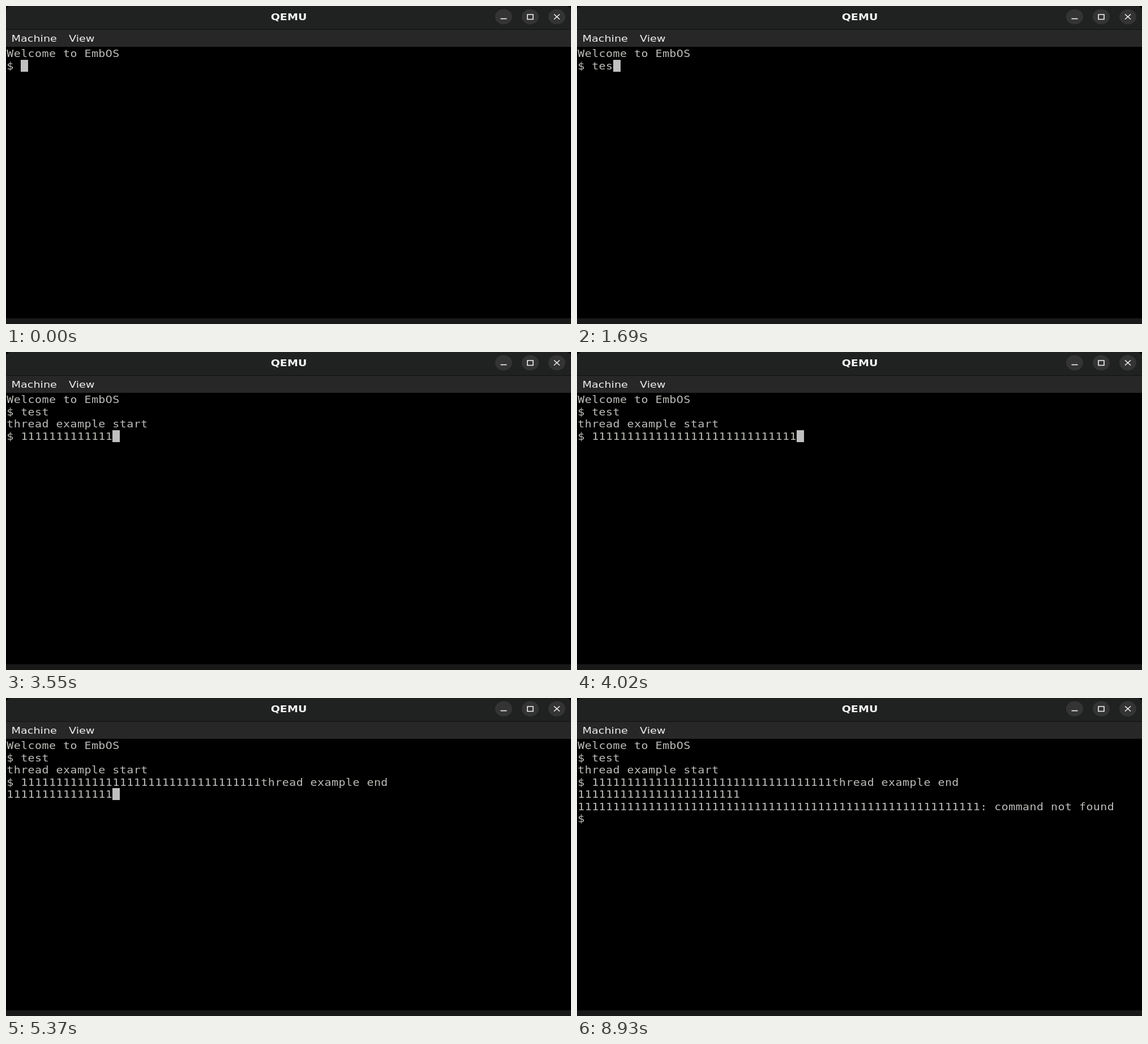
An HTML page with a canvas that plays this animation: 998 px wide and 561 px high, repeating every 9.6 s.

```html
<!DOCTYPE html>
<html lang="en">
<head>
<meta charset="utf-8">
<title>Terminal</title>
<style>
  html, body { margin: 0; width: 100%; height: 100%; overflow: hidden; background: #000; }
  canvas { display: block; }
</style>
</head>
<body>
<canvas id="stage" width="998" height="561"></canvas>
<script>
const ctx = document.getElementById('stage').getContext('2d');
const LOOP = 9600;
const CELL_W = 12.475, CELL_H = 21.55, LEFT = 1.2, TOP = 73;
const HIDDEN = [[500, 1100], [2900, 3250], [6540, 7140], [7720, 8320], [8930, LOOP]];
const TEST_KEYS = [1280, 1580, 1690, 1900];

const ones = n => '1'.repeat(n);

// Number of repeated keys, growing evenly from a to b between t0 and t1
function keys(t, t0, t1, a, b) {
  const p = Math.min(1, Math.max(0, (t - t0) / (t1 - t0)));
  return Math.floor(a + (b - a) * p + 1e-6);
}

function secondRow(t) {
  if (t < 4220) return 0;
  if (t < 4870) return keys(t, 4220, 4590, 2, 13);
  return keys(t, 5370, 5570, 15, 23);
}

function screen(t) {
  const typed = TEST_KEYS.filter(k => t >= k).length;
  const lines = ['Welcome to EmbOS', '$ ' + 'test'.slice(0, typed)];
  if (t < 2200) return lines;
  lines.push('thread example start');
  if (t < 3250) return [...lines, '$ '];
  if (t < 4190) {
    const n = t < 4020 ? keys(t, 3250, 4020, 4, 29) : keys(t, 4020, 4190, 29, 34);
    return [...lines, '$ ' + ones(n)];
  }
  lines.push('$ ' + ones(34) + 'thread example end', ones(secondRow(t)));
  if (t >= 5970) lines.push(ones(57) + ': command not found', '$ ');
  return lines;
}

function rect(x, y, w, h, color) {
  ctx.fillStyle = color;
  ctx.fillRect(x, y, w, h);
}

// The whole window is shown wider than its natural proportions
function label(text, x, y, font, color, sx, sy, spacing = 0) {
  ctx.save();
  ctx.translate(x, y);
  ctx.scale(sx, sy);
  ctx.font = font;
  ctx.letterSpacing = spacing + 'px';
  ctx.fillStyle = color;
  ctx.fillText(text, 0, 0);
  ctx.restore();
}

function stroke(points, close) {
  ctx.beginPath();
  points.forEach(([x, y], i) => i ? ctx.lineTo(x, y) : ctx.moveTo(x, y));
  if (close) ctx.closePath();
  ctx.stroke();
}

function drawWindow() {
  rect(0, 0, 998, 561, '#000');
  ctx.fillStyle = '#202121';
  ctx.beginPath();
  ctx.roundRect(0, 0, 998, 41, [8, 8, 0, 0]);
  ctx.fill();
  rect(0, 41, 998, 1, '#111');
  rect(0, 42, 998, 30, '#272727');
  rect(0, 551, 998, 10, '#191919');

  ctx.textAlign = 'center';
  label('QEMU', 499.5, 25, 'bold 15.3px "DejaVu Sans", sans-serif', '#f4f4f4', 1.2475, 1.08);
  ctx.textAlign = 'left';
  const menuFont = '15.4px "DejaVu Sans", sans-serif';
  label('Machine', 9.5, 63, menuFont, '#eee', 1.2475, 1.08);
  label('View', 111, 63, menuFont, '#eee', 1.2475, 1.08);

  ctx.fillStyle = '#343434';
  for (const x of [879, 926, 973]) {
    ctx.beginPath();
    ctx.ellipse(x, 19, 15, 13.5, 0, 0, Math.PI * 2);
    ctx.fill();
  }
  ctx.strokeStyle = '#f4f4f4';
  ctx.lineWidth = 1.6;
  stroke([[873.5, 22.5], [884.5, 22.5]]);
  stroke([[921, 15], [931, 15], [931, 23.5], [921, 23.5]], true);
  stroke([[968, 14.5], [978, 23.5]]);
  stroke([[978, 14.5], [968, 23.5]]);
}

function draw(t) {
  drawWindow();
  const lines = screen(t);
  lines.forEach((line, row) =>
    label(line, LEFT, TOP + row * CELL_H + 17,
      '16px "DejaVu Sans Mono", monospace', '#bcbcb8', CELL_W / 10, CELL_H / 19, 0.367));
  if (HIDDEN.some(([from, to]) => t >= from && t < to)) return;
  const row = lines.length - 1;
  rect(Math.round(LEFT + lines[row].length * CELL_W), Math.round(TOP + row * CELL_H), 13, 21, '#c0c0c0');
}

const start = performance.now();
function tick() {
  draw((performance.now() - start) % LOOP);
  requestAnimationFrame(tick);
}
tick();
</script>
</body>
</html>
```
